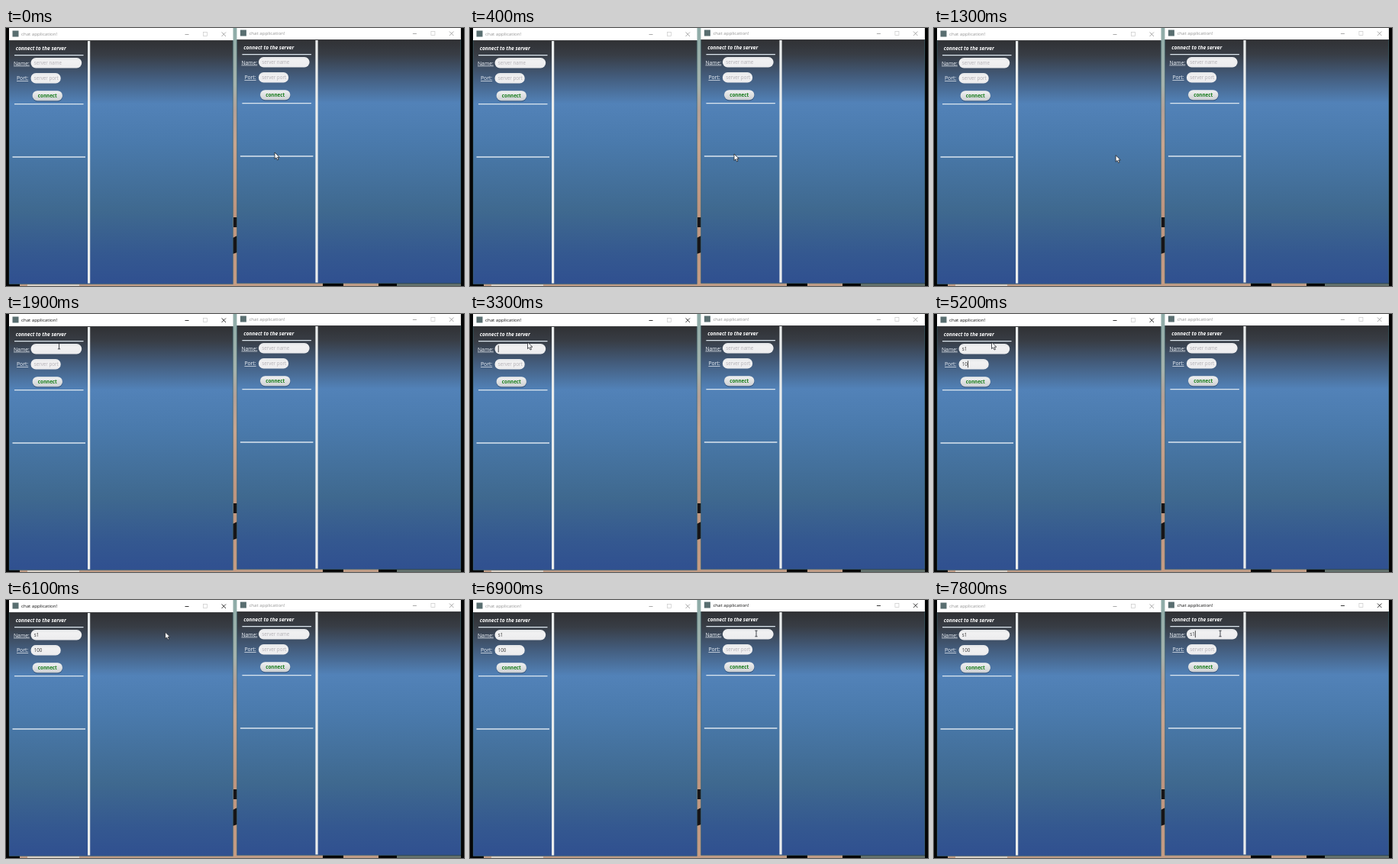
An HTML page for the animation above (8 s loop, 600x338 px).

```html
<!DOCTYPE html>
<html lang="en">
<head>
<meta charset="utf-8">
<title>Chat application</title>
<style>
  html, body { margin: 0; width: 100%; height: 100%; overflow: hidden; background: #000; }
  svg { display: block; width: 100vw; height: 100vh; }
  text { font-family: "Open Sans", "Noto Sans", sans-serif; white-space: pre; }
  .title { font-size: 6.15px; }
  .heading { font-size: 6.6px; font-weight: 700; font-style: italic; fill: #fff; }
  .label { font-size: 6.8px; fill: #f1f5fa; text-decoration: underline; }
  .input { font-size: 6.2px; }
  .button { font-size: 6.25px; font-weight: 700; fill: #137a17; text-anchor: middle; }
  .rule { stroke: #dce6ef; stroke-width: 1.4; }
</style>
</head>
<body>
<svg id="stage" viewBox="0 0 600 338" preserveAspectRatio="none">
  <defs>
    <linearGradient id="panel" x2="0" y2="1">
      <stop offset="0" stop-color="#303134"/>
      <stop offset=".06" stop-color="#383d45"/>
      <stop offset=".15" stop-color="#435c7c"/>
      <stop offset=".26" stop-color="#5282b8"/>
      <stop offset=".42" stop-color="#4a7aac"/>
      <stop offset=".7" stop-color="#3f698f"/>
      <stop offset=".88" stop-color="#345890"/>
      <stop offset="1" stop-color="#305090"/>
    </linearGradient>
    <linearGradient id="field" x2="0" y2="1">
      <stop offset="0" stop-color="#e4e6e8"/>
      <stop offset=".3" stop-color="#f1f1f2"/>
      <stop offset="1" stop-color="#ececee"/>
    </linearGradient>
    <linearGradient id="knob" x2="0" y2="1">
      <stop offset="0" stop-color="#f0f1f1"/>
      <stop offset=".5" stop-color="#dfe1e2"/>
      <stop offset="1" stop-color="#cdd0d3"/>
    </linearGradient>
    <linearGradient id="sliver" x2="0" y2="1">
      <stop offset="0" stop-color="#8eaca8"/>
      <stop offset=".22" stop-color="#a5b3ad"/>
      <stop offset=".32" stop-color="#b4a096"/>
      <stop offset=".45" stop-color="#c7a58f"/>
      <stop offset=".7" stop-color="#bd9580"/>
      <stop offset="1" stop-color="#c49c83"/>
    </linearGradient>
  </defs>
  <g id="desktop">
    <rect width="600" height="338" fill="#050606"/>
    <rect x="297" width="6" height="338" fill="url(#sliver)"/>
    <path d="M298 248h5v13h-5zM297 275l6-3v22l-6 2z" fill="#171517"/>
    <path d="M18 335h280v3H18zM303 334h112v4H303zM442 334h46v4h-46z" fill="#bf9c86"/>
    <path d="M28 336h68v2H28z" fill="#d8cfc5"/>
    <path d="M512 335h84v3h-84z" fill="#62706c"/>
  </g>
  <g id="windows"></g>
  <path id="arrow" d="M0 0V8.6L2 6.8L3.5 10L5 9.3L3.6 6.2H6.3Z" fill="#fff" stroke="#20242a" stroke-width=".8"/>
  <path id="beam" d="M-1.6 -3.8H1.6M0 -3.8V3.8M-1.6 3.8H1.6" fill="none" stroke="#30343a" stroke-width=".9"/>
</svg>
<script>
const LOOP = 8000;
const byId = id => document.getElementById(id);

function add(parent, tag, attrs, content = "") {
  const el = document.createElementNS("http://www.w3.org/2000/svg", tag);
  for (const key in attrs) el.setAttribute(key, attrs[key]);
  el.textContent = content;
  return parent.appendChild(el);
}

function makeField(root, y, width, hint) {
  add(root, "rect", { x: 32.5, y, width, height: 13.4, rx: 6.6, fill: "url(#field)" });
  const text = add(root, "text", { class: "input", x: 36.8, y: y + 9 });
  const caret = add(root, "rect", { y: y + 2.2, width: .8, height: 9, fill: "#222" });
  return ({ value = "", focused = false, blink = false }) => {
    text.textContent = value || (focused ? "" : hint);
    text.setAttribute("fill", value ? "#333" : "#b3b0b5");
    caret.setAttribute("x", 36.8 + (value ? text.getComputedTextLength() + .2 : 0));
    caret.setAttribute("visibility", focused && blink ? "visible" : "hidden");
  };
}

function makeWindow(dx, dy) {
  const root = add(byId("windows"), "g", { transform: `translate(${dx} ${dy})` });
  const rule = (x1, x2, y) => add(root, "line", { class: "rule", x1, x2, y1: y, y2: y });
  const label = (cls, x, y, content) => add(root, "text", { class: cls, x, y }, content);

  add(root, "rect", { x: 4, y: -1, width: 293.5, height: 17.5, fill: "#fff" });
  add(root, "rect", { x: 4, y: 16.2, width: 293.5, height: 319.3, fill: "url(#panel)" });
  add(root, "path", { d: "M4.3 16V335.3H297.2V16", fill: "none", stroke: "#41676f", "stroke-width": .6 });
  add(root, "rect", { x: 8.5, y: 3.5, width: 8, height: 8, fill: "#596e70" });
  const title = label("title", 20, 10.4, "chat application!");
  const controls = add(root, "path", { d: "M234.5 8.5H239.5M282.5 5.5L288 11M288 5.5L282.5 11", fill: "none", "stroke-width": .9 });
  add(root, "rect", { x: 258.5, y: 5.5, width: 5, height: 5, fill: "none", stroke: "#c9c9c9", "stroke-width": .7 });

  add(root, "rect", { x: 107, y: 17, width: 3.2, height: 317.5, fill: "#e9ecec" });
  label("heading", 12.8, 29.2, "connect to the server");
  rule(11, 101.5, 35.6);
  label("label", 10, 48.6, "Name:");
  label("label", 14, 68.3, "Port:");
  const name = makeField(root, 39, 66.7, "server name");
  const port = makeField(root, 59.1, 39.2, "server port");
  add(root, "rect", { x: 34.6, y: 83.2, width: 39.6, height: 13.2, rx: 6.5, fill: "#203450", opacity: .45 });
  add(root, "rect", { x: 34.6, y: 82.2, width: 39.4, height: 13, rx: 6.5, fill: "url(#knob)" });
  label("button", 54.3, 91, "connect");
  rule(11, 101.5, 99.6);
  rule(8.5, 104, 169);

  return {
    name, port,
    activate(on) {
      title.setAttribute("fill", on ? "#111" : "#949494");
      controls.setAttribute("stroke", on ? "#222" : "#a0a0a0");
    }
  };
}

const left = makeWindow(0, 0);
const right = makeWindow(298.4, -1);

// [time, x, y]
const route = [
  [0, 352, 163], [200, 352, 163], [400, 346, 165], [1050, 346, 165],
  [1300, 238.5, 167], [1500, 155, 108], [1700, 80, 48], [1800, 69.5, 42],
  [2000, 69.5, 42], [2400, 75.5, 37], [5750, 75.5, 37], [6100, 208, 42],
  [6350, 345, 72], [6500, 399, 82], [6650, 399, 82], [6900, 375, 44], [LOOP, 375, 44]
];

function pointer(t) {
  const i = route.findIndex(p => p[0] > t);
  const [t0, x0, y0] = route[i - 1], [t1, x1, y1] = route[i];
  const k = (t - t0) / (t1 - t0);
  return [x0 + (x1 - x0) * k, y0 + (y1 - y0) * k];
}

// Value of the latest step already reached.
const latest = (t, steps) => steps.reduce((now, [at, value]) => t >= at ? value : now, "");
const within = (t, a, b) => t >= a && t < b;

function render(t) {
  const leftOn = within(t, 1800, 6900), rightOn = t >= 6900;
  left.activate(leftOn);
  right.activate(rightOn);
  left.name({
    value: latest(t, [[3500, "s"], [3800, "s1"]]),
    focused: within(t, 1800, 4300),
    blink: within(t, 2000, 2500) || within(t, 3000, 4000)
  });
  left.port({
    value: latest(t, [[4800, "1"], [5200, "10"], [5500, "100"]]),
    focused: within(t, 4300, 6900),
    blink: t < 6000 || within(t, 6500, 6900)
  });
  right.name({
    value: latest(t, [[7500, "s"], [7700, "s1"]]),
    focused: rightOn,
    blink: t >= 7000
  });
  right.port({});

  const [x, y] = pointer(t);
  const overField = (x > 33 && x < 99 && y > 39 && y < 52) || (x > 331 && x < 397 && y > 38 && y < 51);
  for (const [id, shown] of [["arrow", !overField], ["beam", overField]]) {
    byId(id).setAttribute("transform", `translate(${x} ${y})`);
    byId(id).setAttribute("visibility", shown ? "visible" : "hidden");
  }
}

const start = performance.now();
function tick() {
  render((performance.now() - start) % LOOP);
  requestAnimationFrame(tick);
}
tick();
</script>
</body>
</html>
```
